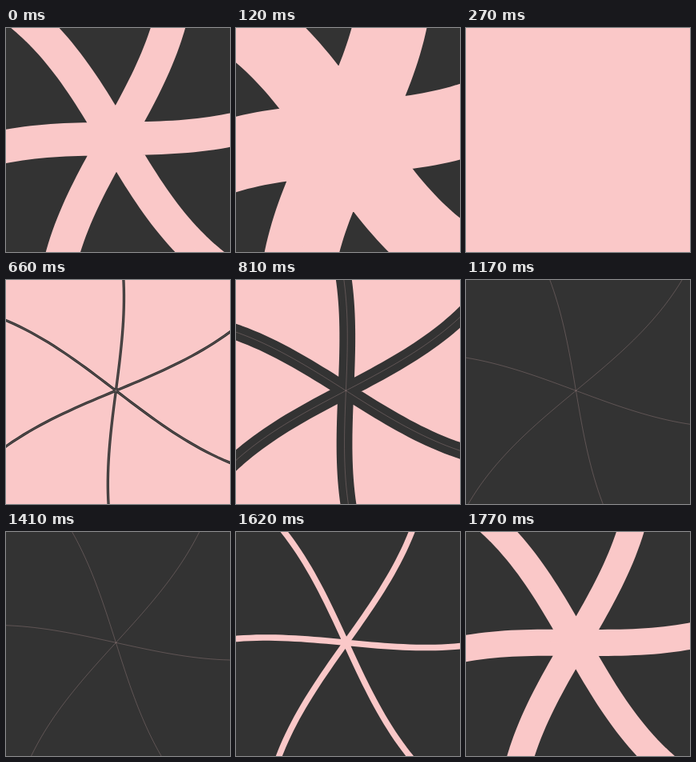
Animation, 280 px wide and 280 px high, one loop 1800 ms. Source, as an HTML page with a canvas:

```html
<!DOCTYPE html>
<html lang="en">
<head>
<meta charset="utf-8">
<title>Turning arms</title>
<style>
  html, body { margin: 0; width: 100%; height: 100%; overflow: hidden; background: #fac8c8; }
  canvas { display: block; width: 280px; height: 280px; }
</style>
</head>
<body>
<canvas id="stage" width="280" height="280"></canvas>
<script>
  const ctx = document.getElementById('stage').getContext('2d');
  const SIZE = 280, CX = 137.4, CY = 138.3;
  const LOOP = 1800, HALF = 900, STEP = 30;
  const PINK = '#fac8c8', DARK = '#333333';
  const RAD = Math.PI / 180;

  // An arm bends away from its starting angle with the square of the radius.
  function armPoint(r, angle) {
    const a = (angle + 0.00018 * r * r) * RAD;
    return [CX + r * Math.cos(a), CY - r * Math.sin(a)];
  }

  // Three curves through the centre make six arms.
  function armsPath(turn) {
    const path = new Path2D();
    for (let i = 0; i < 3; i++) {
      for (let r = -320; r <= 320; r += 8) {
        const [x, y] = armPoint(r, turn + i * 60);
        if (r === -320) path.moveTo(x, y);
        else path.lineTo(x, y);
      }
    }
    return path;
  }

  function strokeArms(path, color, width, alpha) {
    ctx.globalAlpha = alpha;
    ctx.strokeStyle = color;
    ctx.lineWidth = width;
    ctx.stroke(path);
    ctx.globalAlpha = 1;
  }

  function fill(color) {
    ctx.fillStyle = color;
    ctx.fillRect(0, 0, SIZE, SIZE);
  }

  function draw(t) {
    const phase = (t + HALF / 2) % LOOP;
    const toDark = phase >= HALF;
    const width = 51.5 * Math.pow((phase % HALF) / 480, 3.33);
    const under = toDark ? PINK : DARK;
    const over = toDark ? DARK : PINK;
    const arms = armsPath(0.6 + t / 30);

    if (width > 190) {
      fill(over);
    } else {
      fill(under);
      if (width > 0.1) strokeArms(arms, over, width, 1);
    }
    // Faint seam where neighbouring blades meet.
    strokeArms(arms, PINK, 1, 0.22);
  }

  const start = performance.now();
  function tick() {
    const t = (performance.now() - start) % LOOP;
    draw(Math.floor(t / STEP) * STEP);
    requestAnimationFrame(tick);
  }
  ctx.lineJoin = 'round';
  tick();
</script>
</body>
</html>
```
